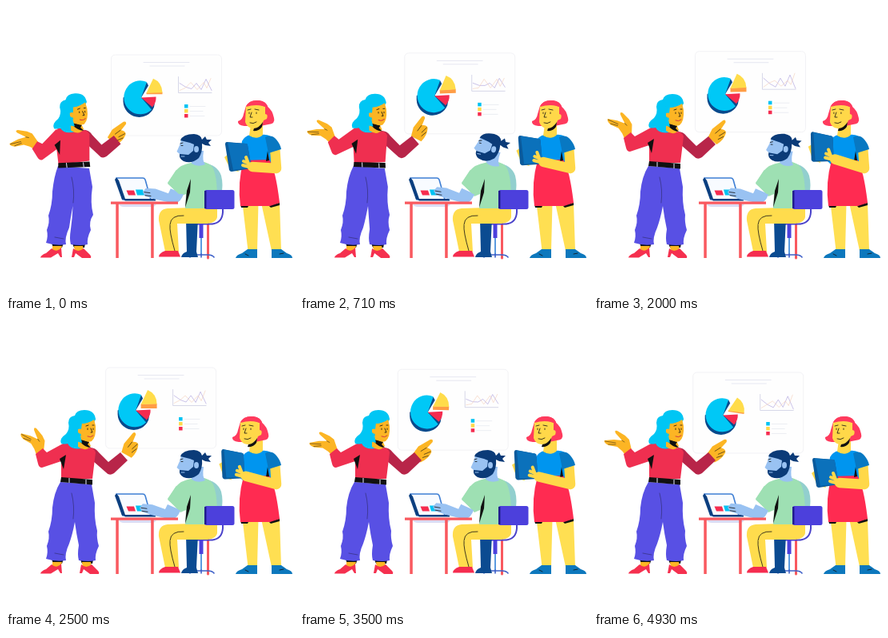
Recreate the animation shown at these times as an HTML page. Size 360x360 px, loop 5 s.

```html
<!DOCTYPE html>
<html lang="en">
<head>
<meta charset="utf-8">
<title>Team presentation</title>
<style>
html, body { margin: 0; width: 100%; height: 100%; overflow: hidden; background: #fff; }
svg { display: block; width: 100vw; height: 100vh; }
.line { fill: none; stroke-linecap: round; stroke-linejoin: round; }
.ink { fill: none; stroke: #111; stroke-width: .8; stroke-linecap: round; stroke-linejoin: round; }
</style>
</head>
<body>
<svg viewBox="0 0 360 360">
  <g id="board">
    <rect x="131.500" y="61.500" width="138" height="101" rx="5" fill="#fefefe" stroke="#efeff3" stroke-width=".8"/>
    <path class="line" stroke="#e0e1ee" stroke-width=".8" d="M172 71H229M180 75.500H223"/>
    <path class="line" stroke="#c6c8e0" stroke-width=".7" d="M215.500 89V109H257"/>
    <path class="line" id="lineA" stroke="#b5a9e0" stroke-width=".7"/>
    <path class="line" id="lineB" stroke="#f3cdb8" stroke-width=".6"/>
    <path fill="#00c3f3" d="M223 123.500h4.500v4.500h-4.500z"/>
    <path fill="#ffd94a" d="M223 129.500h4.500v4.500h-4.500z"/>
    <path fill="#f52c4f" d="M223 135.500h4.500v4.500h-4.500z"/>
    <path class="line" stroke="#e8eaf0" stroke-width=".8" d="M230 126H249M230 132H246M230 138H248"/>
    <path fill="#084a8c" d="M146.500 115V120A20 20 0 0 0 185 127L186 121 169 115 178 100 176 96z"/>
    <path fill="#00c8f6" d="M169 115L176 95.500A20.500 21 0 1 0 182 130z"/>
    <path fill="#f52c4f" d="M169 115L187.500 114Q188 121 183 127z"/>
    <g id="slice">
      <path id="sliceSide" fill="#ff9d45"/>
      <path fill="#ffdc4a" d="M175.500 109.500L184 91.500Q195 96 195.500 109z"/>
    </g>
  </g>

  <!-- desk, laptop and seated man -->
  <path fill="#dadcf4" d="M141 248H188Q186 251 182 251H147Q143 251 141 248z"/>
  <path class="line" stroke="#f9595f" stroke-width="3" d="M252.500 254V315" stroke-linecap="butt"/>
  <path class="line" stroke="#4a42ca" stroke-width="2" d="M271 253V258Q270 271 258 272.500H231"/>
  <path class="line" stroke="#5b9be0" stroke-width="2" d="M244 288V311"/>
  <path fill="#4c40dc" d="M241.500 273h5v17h-5z"/>
  <path class="line" stroke="#3d5fc8" stroke-width="1.600" d="M230 314Q231 311 237 311H252Q258 311 260 314M244 310V314"/>
  <path fill="#0b4b91" d="M225 266H240L238 307 240 314H219Q220 309 226 307z"/>
  <path fill="#ffdc4d" d="M264 251V264Q262 272 248 272H214L216 307H199L191 268Q190 254 202 253z"/>
  <path class="ink" d="M205 274Q204 282 211 306M222 262Q206 261 205 273"/>
  <path fill="#f52c4f" d="M199 306H215L218 313.500H191Q191 309 199 306z"/>
  <path fill="#92cfce" d="M246 196Q264 198 269 212 272 224 269 236H252z"/>
  <path fill="#9ee0b3" d="M231 196Q244 191 256 199 265 207 264 253H224L225 235 218 238 202 221 212 206Q219 198 231 196z"/>
  <path fill="#111" d="M231 216L230 233 224 252 226 231z"/>
  <rect x="248" y="230" width="37.500" height="24" rx="2.500" fill="#4c40dc"/>
  <path fill="#211c8e" d="M248 231h2.500v22h-2.500z"/>
  <g id="manHead">
    <path fill="#99c2f2" d="M233 181H247Q245 194 249 198 240 202 232 197z"/>
    <path fill="#99c2f2" d="M219 167L241 166V188L222 192 217 185 213.500 182 217 174z"/>
    <path fill="#0b3b78" d="M218 168Q221 160 235 160 244 161 245 167L249 163 251 167 257 167 253 171 256 175 249 174 245 172Q246 182 241 190 232 198 222 194 216 191 217 185L228 186 234 181 235 173 230 171z"/>
    <ellipse cx="238" cy="179" rx="3" ry="4" fill="#99c2f2"/>
    <path class="ink" d="M219 174.500h2M218 172l3-1"/>
    <path class="line" stroke="#99c2f2" d="M219 188h4"/>
  </g>
  <path fill="#f8fbff" stroke="#3f7fd4" stroke-width="1.600" stroke-linejoin="round" d="M138 215H171Q173 215 174 217L181 242H146z"/>
  <path fill="#0b3f80" d="M136 217L138 214.500 141 218 149 241 145 242z"/>
  <path fill="#f52c4f" d="M150.500 230.500H160L162 236.500H153z"/>
  <path fill="#00c3f3" d="M162 229.500H171L173 236.500H164z"/>
  <path fill="#0b3f80" d="M146 241H187V243.500H149z"/>
  <g id="manArm">
    <path fill="#99c2f2" d="M206 228L222 235Q219 245 211 247L186 241 174 237 171 232 175 227 187 228 203 234z"/>
    <path class="ink" stroke-width=".6" d="M173 232l7 1M174 236l7 1"/>
  </g>
  <path fill="#9ee0b3" d="M213 205L228 214 225 235 216 235 202 222z"/>
  <path fill="#f9595f" d="M131 244.500H215V247.800H184.700V315H181.200V247.800H140.800V315H137.300V247.800H131z"/>

  <!-- woman with the tablet -->
  <path fill="#ffdf52" d="M295.500 246H315.500L314 306H302.500zM319 246H342L344 306H332z"/>
  <path fill="#0d78bd" d="M302 304H314V315H287Q288 311 295 309zM332 304H344L351 309Q358 311 358 315H332z"/>
  <path class="ink" d="M299 310l4 2M342 310l5-1"/>
  <path fill="#0095ef" d="M305 161Q298 163 295 169L292 194 300 202H329L336 190Q338 171 332 164 327 160 319 161z"/>
  <path fill="#111" d="M293 248H304L302 252H294zM328 249L342 246V249L331 252z"/>
  <path fill="#ff2b51" d="M297 193L329 192Q337 204 342 246L330 250H293Q289 221 297 193z"/>
  <path fill="#111" d="M327 181L325 194 329 193z"/>
  <path fill="#ffd849" d="M306 148H321V161Q314 168 304 162z"/>
  <g id="head2">
    <path fill="#ff3a5d" d="M300 125Q305 117 316 118 325 119 327 126 333 130 335 140 337 147 328 148L318 150 298 150Q289 149 290 144 296 142 297 135z"/>
    <path fill="#ffd849" d="M300 125Q312 120 324 126L324 135Q328 135 326 141L322 143Q320 153 309 153 301 152 299 145z"/>
    <path fill="#ff3a5d" d="M300 126Q303 117 316 118 326 119 328 128 316 121 300 126z"/>
    <path fill="#111" d="M310 153Q317 152 321 145L320 151Q316 157 309 156z"/>
    <path class="ink" d="M302 130l4-1M311 129l5 1M304 133v1.500M313 133v1.500M307 133l-2 6h3M305 146q4 2 8-1"/>
  </g>
  <g id="tablet">
    <path fill="#ffd849" d="M276 195L273 189 278 185 284 193 291 207 281 205z"/>
    <path fill="#0a5a9c" d="M276 170L300 172Q302 172 302 174L307 203 282 207Q280 207 279 205L274 173Q274 170 276 170z"/>
    <path fill="#0b71bb" d="M277 170.500L300 172Q302 172 302 174L307 202 284 205z"/>
  </g>
  <path class="line" id="arm2" stroke="#ffd849" stroke-width="12.500"/>
  <path class="line" id="fingers2" stroke="#ffd849" stroke-width="4"/>
  <path fill="#0878c2" d="M324 164Q332 160 338 167 343 173 344 179L328 184z"/>

  <!-- presenter -->
  <path fill="#111" d="M57 296H72L70 302H59z"/>
  <path fill="#fcb524" d="M58 300H70L68 307H58z"/>
  <path fill="#f5304f" d="M57 303Q63 309 69 302L70 314H68L65 309 56 314.500H43Q44 311 50 309z"/>
  <g id="rightFoot">
    <path fill="#111" d="M93 297H109L108 302H95z"/>
    <path fill="#fcb524" d="M95 300H106L107 307H96z"/>
    <path fill="#f5304f" d="M94 303Q100 309 107 303L115 311Q117 313 116 315H105L97 309 95 314H92z"/>
  </g>
  <path id="pants" fill="#5850e4"/>
  <path class="ink" stroke-width=".5" d="M82 214Q86 230 84 246M61 289l11 2" opacity=".45"/>
  <g id="upper">
    <g id="leftArm">
      <g id="leftHand">
        <path fill="#fcb524" d="M35 161L29 156 18 154Q12 151 13 148L25 147 35 148 27 139Q25 135 29 136L39 142 44 147 47 160 39 166z"/>
        <path class="ink" stroke-width=".6" d="M14 149l13 2M18 153l9 0M35 148l3 2" opacity=".6"/>
      </g>
      <path fill="#ef2f50" d="M37 165L46 158 51 163 73 151 82 157 75 172 45 182Q41 182 40 177z"/>
    </g>
    <g id="rightArm">
      <g id="pointer">
        <path fill="#fcb524" d="M141 165L148 156 163 148Q167 147 166 151L159 158Q165 160 164 164 160 172 150 176z"/>
        <path class="ink" stroke-width=".7" d="M158 158l-7 4M163 163l-8 3M160 168l-7 2" opacity=".75"/>
      </g>
      <path fill="#b82549" d="M105 157Q112 157 116 163L128 175 143 163 152 173 135 189Q129 193 125 188L109 174z"/>
    </g>
    <path fill="#ef2f50" d="M73 151L88 151 101 157Q110 156 112 163L108 196H69V173z"/>
    <path fill="#111" d="M67 171L75 166 72 184z"/>
    <path fill="#111" d="M69 194L108 197V203.500L68 200z"/>
    <path stroke="#e8e9ff" stroke-width="1" d="M79 195v6M100 197v6"/>
    <g id="head1">
      <path fill="#00c6f4" d="M112 122Q111 110 98 110 88 110 86 117 78 118 78 126 80 134 75 140 66 146 69 152 73 153 77 152 81 160 94 158 101 153 98 143z"/>
      <path fill="#fcb524" d="M90 140L103 148 106 155Q100 163 90 156z"/>
      <path fill="#111" d="M93 147L104 150 102 153 106 157Q99 157 93 150z"/>
      <path fill="#fcb524" d="M94 127Q104 127 110 121L112 130Q113 144 107 149 100 151 95 145L92 136z"/>
      <path fill="#00c6f4" d="M89 127Q103 127 112 121L106 114 90 117zM88 126L95 126 93 142 95 151 87 149z"/>
      <path fill="#fcb524" d="M90 134q5-2 5 3-1 5-5 1z"/>
      <path class="ink" d="M100 130l3-1M108 129l2 0M102 133v1.500M109 133v1.500M106 133l2 5h-2"/>
      <path class="line" stroke="#d63a40" stroke-width="1" d="M102 143q4 2 7-1"/>
    </g>
  </g>
</svg>
<script>
const LOOP = 5000, FRAMES = 70, TAU = Math.PI * 2;
const keys = [0, .71, 1.36, 2.5, 3.5, 4.21, 4.93];
const $ = id => document.getElementById(id);
const set = (id, value, name = 'transform') => $(id).setAttribute(name, value);
const shift = (x, y) => `translate(${x} ${y})`;
const turn = (a, x, y) => `rotate(${a} ${x} ${y})`;
const wave = (t, peak, period) => Math.cos(TAU * (t - peak) / period);

// Smooth cubic curve through one value per key time
function follow(t, v, times = keys) {
  const last = times.length - 1;
  let i = 0;
  while (i < last - 1 && t > times[i + 1]) i++;
  const slope = k => {
    const a = Math.max(k - 1, 0), b = Math.min(k + 1, last);
    return (v[b] - v[a]) / (times[b] - times[a]);
  };
  const d = times[i + 1] - times[i], u = Math.min(1, (t - times[i]) / d), w = 1 - u;
  return w * w * (1 + 2 * u) * v[i] + u * u * (3 - 2 * u) * v[i + 1]
    + d * u * w * (w * slope(i) - u * slope(i + 1));
}

function drawBoard(t) {
  set('board', shift(4.75 * (wave(t, 0, 7.7) - 1), -1.4 - 3.4 * wave(t, 2.05, 7)));
  const side = follow(t, [2.5, 5, 5, 6, 5, 1, 2]);
  set('sliceSide', `M175.500 109L195.500 108.500V${108.5 + side}H175.500z`, 'd');
  set('slice', shift(0, -side / 2 + 1) + turn(follow(t, [0, -2, -2, 0, 2, 14, 9]), 176, 110));
  const w = 2 * Math.sin(t * 2.4);
  set('lineA', `M217 ${97 + w}L225 102 232 ${104 - w} 238 ${97 + w} 244 105 250 ${92 + w / 2} 257 ${106 - w}`, 'd');
  set('lineB', `M217 106L224 ${103 + w} 231 ${96 - w} 239 105 247 ${96 - w} 251 103 256 ${91 + w}`, 'd');
}

function drawPresenter(t) {
  const sway = .5 + .5 * Math.cos(Math.PI * Math.min(1, t / 1.25));
  const lift = .5 + .5 * wave(t, .68, 1.77);
  const waist = -3 * sway, knee = -5 * sway, foot = -10 * sway;
  set('upper', shift(waist, 0) + turn(-7 * sway, 88, 200));
  set('head1', turn(3 * sway, 96, 150));
  set('leftArm', turn(-11 * sway, 76, 160));
  set('leftHand', turn(follow(t, [-4, 0, 0, 20, -10, -6, -3, 0], [0, .71, 1.36, 2.45, 3.1, 3.5, 4.21, 4.93]), 42, 161));
  set('rightArm', turn(9 * sway, 108, 160));
  set('pointer', shift(4 * lift - 6 * sway, -5 * lift) + turn(-22 * lift - 6 * sway, 148, 168));
  set('rightFoot', shift(foot, 0));
  set('pants', `M${68 + waist} 200Q60 213 58 232 58 248 53 262 55 270 51 280 53 288 50 296
    Q62 300 75 298 73 290 79 277 ${83 + knee / 2} 266 ${86 + knee / 2} 250
    ${88 + knee} 265 ${91 + foot} 279 ${89 + foot} 291 ${91 + foot} 298
    Q${104 + foot} 300 ${112 + foot} 298 ${111 + foot} 290 ${116 + foot} 280
    ${113 + foot} 270 ${114 + knee} 261 ${110 + knee} 246 ${111 + waist} 226L${107 + waist} 203z`, 'd');
}

function drawMan(t) {
  const tilt = follow(t, [0, 1, 1, 0, 0, 0, 0]);
  set('manHead', shift(2 * tilt, 0) + turn(11 * tilt, 238, 190));
  set('manArm', turn(follow(t, [-1, 1, 0, 0, 1, 0, 0]) + .8 * Math.sin(t * 9), 214, 238)
    + shift(follow(t, [0, -4, -4, -4, -5, -5, -4]), 0));
}

function drawReader(t) {
  const x = follow(t, [0, -1, -.5, -4.5, -6, -3.5, -1]);
  const y = follow(t, [0, -8, -14, -11, -10, -4, 0]);
  const lean = -y / 15;
  set('head2', shift(follow(t, [0, 0, 0, -7, -7, -4, -1]), 0));
  set('tablet', shift(x, y) + turn(9 * lean, 276, 170));
  const hx = 300 + x - 5 * lean, hy = 197 + y * .75;
  set('arm2', `M336 176L338 203 ${hx + 8} ${hy + 4}`, 'd');
  set('fingers2', `M${hx + 8} ${hy + 2}L${hx - 3} ${hy - 3}M${hx + 7} ${hy + 5}L${hx - 4} ${hy + 2}M${hx + 3} ${hy}L${hx} ${hy - 8}`, 'd');
}

function draw() {
  const step = Math.floor((performance.now() % LOOP + 5) * FRAMES / LOOP) % FRAMES;
  const t = step * LOOP / FRAMES / 1000;
  drawBoard(t);
  drawPresenter(t);
  drawMan(t);
  drawReader(t);
  requestAnimationFrame(draw);
}
draw();
</script>
</body>
</html>
```
